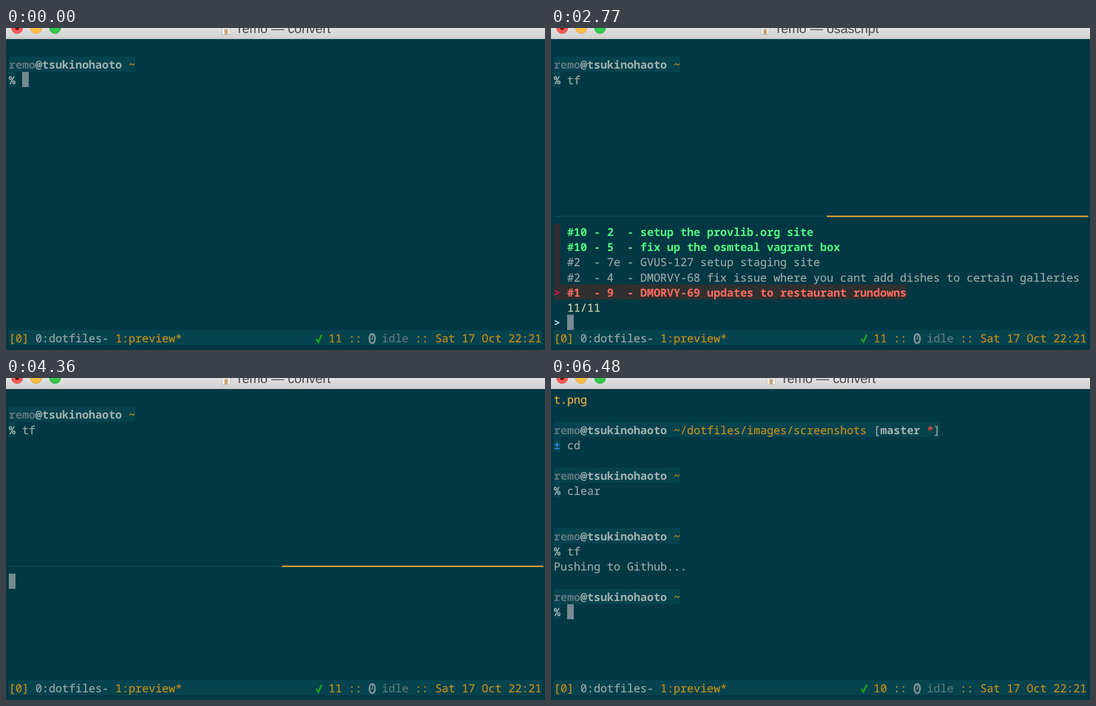
These frames come from a looping animation (967 px wide and 579 px high, 6500 ms). An HTML page:

```html
<!DOCTYPE html>
<html lang="en">
<head>
<meta charset="utf-8">
<title>Terminal task picker</title>
<style>
  html, body { margin: 0; width: 100%; height: 100%; overflow: hidden; background: #003844; }
  svg { display: block; width: 967px; height: 579px; }
  text {
    font: 19.92px "Noto Sans Mono", "DejaVu Sans Mono", monospace;
    fill: currentColor; stroke: currentColor; stroke-width: .3;
    white-space: pre; text-rendering: geometricPrecision;
  }
  #title text { font: 23.4px "Liberation Sans", Arial, sans-serif; color: #474747; stroke: none; }
  .bold { font-weight: bold; stroke: none; }
  .plain { color: #97a5a5; }
  .host { color: #a3b0b0; }
  .user { color: #5e747b; }
  .dim { color: #5c757c; }
  .gold { color: #c28c1b; }
  .file { color: #e8b13c; }
  .blue { color: #2c88d2; }
  .dirty { color: #e04b2e; }
  .red { color: #ff6b60; }
  .green { color: #4ef580; }
  .picked { color: #22d463; }
  .match { color: #a8d4a8; }
  .count { color: #d2d2a6; }
  .mark { color: #a9d6f2; }
  .pointer { color: #dc145c; }
</style>
</head>
<body>
<svg viewBox="0 0 967 579" xml:space="preserve">
  <defs>
    <linearGradient id="chrome" x2="0" y2="1">
      <stop stop-color="#e0e0e0"/><stop offset="1" stop-color="#d1d1d1"/>
    </linearGradient>
  </defs>
  <rect width="967" height="579" fill="#003844"/>
  <rect width="967" height="19" fill="url(#chrome)"/>
  <rect y="19" width="967" height="1" fill="#b4b8b9"/>
  <g stroke-width="1">
    <circle cx="20" r="10" fill="#fc5b57" stroke="#dd4643"/>
    <circle cx="54" r="10" fill="#fdbe41" stroke="#dfa034"/>
    <circle cx="88" r="10" fill="#34c84a" stroke="#26aa36"/>
    <circle cx="20" r="3.5" fill="#6b0805"/>
  </g>
  <g id="title"></g>
  <g id="screen"></g>
  <path d="M556.5 559l4 5.5 6-13" fill="none" stroke="#16a01f" stroke-width="3.2"/>
  <g fill="none" stroke="#7f9195">
    <ellipse cx="657" cy="558.5" rx="5" ry="8.5" stroke-width="3.2"/>
    <path d="M657.5 552v7h-3" stroke-width="1.6"/>
  </g>
</svg>
<script>
const LOOP = 6500, CELL_W = 11.952, CELL_H = 27.3, LEFT = 5, TOP = 24.2, BASELINE = 21.8;
const USER = 'remo', HOST = 'tsukinohaoto';
const TITLE_X = { convert: 416, osascript: 405, sh: 441 };
const SHADE = '#05434e', GUTTER = '#303030';

const tasks = [
  ['red bold', '#1  - 9  - DMORVY-69 updates to restaurant rundowns'],
  ['plain', '#2  - 4  - DMORVY-68 fix issue where you cant add dishes to certain galleries'],
  ['plain', '#2  - 7e - GVUS-127 setup staging site'],
  ['green bold', '#10 - 5  - fix up the osmteal vagrant box'],
  ['green bold', '#10 - 2  - setup the provlib.org site'],
  ['green bold', '#10 - a  - test']
];

// Each step overrides part of the state before it.
const steps = [
  [0, { title: 'convert', cmd: '', cursor: [2, 2], left: 11 }],
  [100, { title: 'osascript' }],
  [1690, { title: 'convert', cmd: 't', cursor: [3, 2] }],
  [2000, { title: 'osascript', cmd: 'tf', cursor: [4, 2] }],
  [2340, { cursor: [0, 3] }],
  [2440, { pane: true, cursor: [0, 12] }],
  [2570, { query: '', cursor: [2, 18] }],
  [2670, { filter: '', count: '11/11' }],
  [3520, { query: 's', cursor: [3, 18] }],
  [3620, { filter: 's', count: '9/11' }],
  [3750, { query: 'se', cursor: [4, 18] }],
  [3850, { filter: 'se', count: '7/11' }],
  [3910, { query: 'set', cursor: [5, 18] }],
  [4010, { filter: 'set', count: '6/11', title: 'sh' }],
  [4110, { title: 'osascript' }],
  [4210, { query: null, filter: null, cursor: [0, 12] }],
  [4360, { title: 'convert' }],
  [5410, { title: 'osascript' }],
  [5510, { pane: false, history: true, cursor: [0, 11] }],
  [5560, { left: 10 }],
  [5600, { pushing: true, cursor: [0, 12] }],
  [6460, { finished: true, cursor: [2, 14] }],
  [6480, { title: 'convert' }]
];
let last = {};
const states = steps.map(([, change]) => last = { ...last, ...change });

const x = col => LEFT + col * CELL_W;
const y = row => TOP + row * CELL_H;
const rect = (left, top, w, h, fill) =>
  `<rect x="${left}" y="${top}" width="${w}" height="${h}" fill="${fill}"/>`;
const fill = (col, row, cols, color, rows = 1) =>
  rect(x(col), y(row), cols * CELL_W, rows * CELL_H, color);

// Writes [class, string] runs one after another on the cell grid.
function write(col, row, ...runs) {
  return runs.map(([cls, str]) => {
    const out = str && `<text x="${x(col)}" y="${y(row) + BASELINE}" class="${cls}">${str}</text>`;
    col += str.length;
    return out;
  }).join('');
}

function prompt(row, cmd, path = '~', branch = [], sign = ['host bold', '%']) {
  const runs = [['user bold', USER], ['host bold', '@' + HOST], ['gold', ' ' + path], ...branch];
  const cols = runs.reduce((n, run) => n + run[1].length, 0);
  return fill(0, row, cols, SHADE) + write(0, row, ...runs) +
    fill(0, row + 1, 1, SHADE) + write(0, row + 1, sign, ['plain', ' ' + cmd]);
}

// Fuzzy match: scan forward for the end, then back for the tightest start.
function fuzzy(line, query) {
  const s = line.toLowerCase();
  let end = 0;
  for (const ch of query) {
    end = s.indexOf(ch, end) + 1;
    if (!end) return null;
  }
  let start = end;
  for (const ch of [...query].reverse()) start = s.lastIndexOf(ch, start - 1);
  return [start, end];
}

function list(filter, count) {
  const hits = tasks
    .map(([cls, line]) => ({ cls, line, span: filter ? fuzzy(line, filter) : [0, 0] }))
    .filter(hit => hit.span);
  const size = hit => hit.span[1] - hit.span[0];
  if (filter) hits.sort((a, b) => size(a) - size(b) || a.line.length - b.line.length);
  let out = fill(0, 12, 1, GUTTER, 5);
  hits.slice(0, 5).forEach(({ cls, line, span: [start, end] }, i) => {
    const row = 16 - i;
    if (i === 0) {
      out += fill(0, row, line.length + 2, GUTTER) + write(0, row, ['pointer bold', '&gt;']);
      cls = cls.replace('green', 'picked');
    }
    const matchCls = cls.replace(/^\w+/, 'match');
    out += write(2, row, [cls, line.slice(0, start)],
      [matchCls, line.slice(start, end)], [cls, line.slice(end)]);
  });
  return out + write(2, 17, ['count', count]);
}

function pane({ query, filter, count }) {
  let out = rect(5, 337.4, 490, 2.5, '#0a4853') + rect(495, 337.4, 469, 2.5, '#eaa834');
  if (filter != null) out += list(filter, count);
  if (query != null) out += write(0, 18, ['mark bold', '&gt;']) + write(2, 18, ['host bold', query]);
  return out;
}

function history() {
  const branch = [['plain', ' ['], ['host bold', 'master '], ['dirty bold', '*'], ['plain', ']']];
  return write(0, 0, ['file', 't.png']) +
    prompt(2, 'cd', '~/dotfiles/images/screenshots', branch, ['blue bold', '±']) +
    prompt(5, 'clear');
}

function status(left) {
  return fill(0, 19, 80, SHADE) +
    write(0, 19, ['gold', '[0] '], ['plain', '0:dotfiles- '], ['gold', '1:preview*']) +
    write(48, 19, ['gold', left + ' ::']) + write(56, 19, ['dim', 'idle']) +
    write(61, 19, ['gold', ':: Sat 17 Oct 22:21']);
}

function titleBar(name) {
  const left = TITLE_X[name], icon = left - 31;
  return `<g transform="translate(${icon})">
      <path d="M0 0H20L17.5 2V11.5H2.5V2z" fill="#f0eeea" stroke="#bdb9b4"/>
      <rect x="7" y="2" width="6" height="9.5" fill="#cba676"/>
    </g><text x="${left}" y="9">${USER} — ${name}</text>`;
}

function draw(state) {
  document.getElementById('title').innerHTML = titleBar(state.title);
  let out = status(state.left) + fill(...state.cursor, 1, '#778a90');
  if (state.history) out += history();
  out += prompt(state.history ? 9 : 1, state.cmd);
  if (state.pane) out += pane(state);
  if (state.pushing) out += write(0, 11, ['plain', 'Pushing to Github...']);
  if (state.finished) out += prompt(13, '');
  document.getElementById('screen').innerHTML = out;
}

const begin = performance.now();
let shown = -1;
function tick() {
  const t = (performance.now() - begin) % LOOP;
  const index = steps.filter(([at]) => at <= t).length - 1;
  if (index !== shown) draw(states[shown = index]);
  requestAnimationFrame(tick);
}
tick();
</script>
</body>
</html>
```
